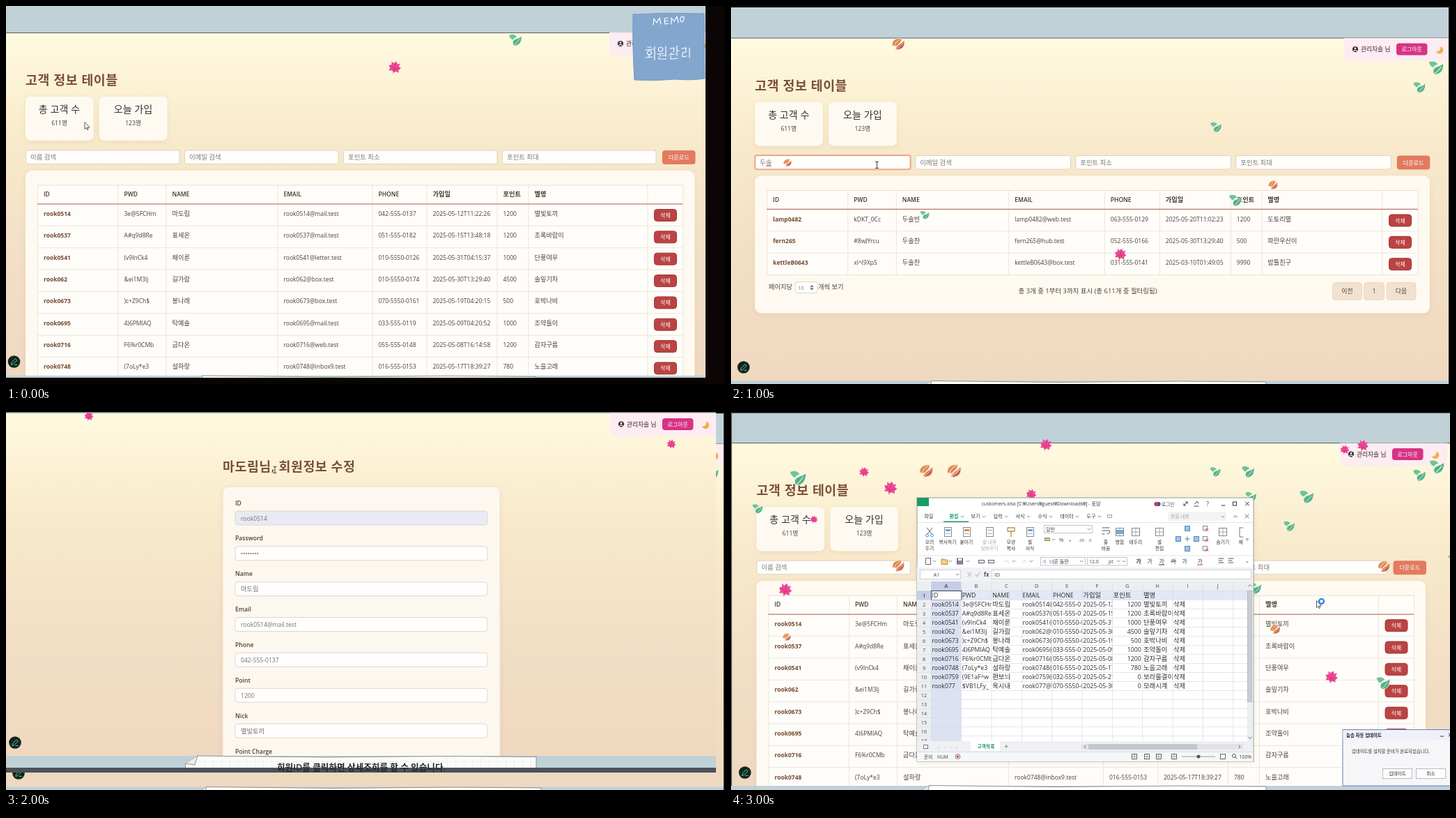
Recreate the animation shown at these times as an HTML page. Size 1032 by 542 pixels, loop 4000 ms.

```html
<!DOCTYPE html>
<html lang="ko">
<head>
<meta charset="utf-8">
<title>고객 정보 테이블</title>
<style>
html, body { margin: 0; width: 100%; height: 100%; overflow: hidden; background: #000; }
#stage { display: block; width: 100vw; height: 100vh; }
text { font-family: "Open Sans", "Noto Sans CJK KR", "Noto Sans CJK", sans-serif; white-space: pre; }
.b { font-weight: 600; }
.bb { font-weight: 700; }
.m { text-anchor: middle; }
.e { text-anchor: end; }
.wide { letter-spacing: .55px; }
.scene { visibility: hidden; animation: show 4s step-end infinite; }
@keyframes show { 0% { visibility: visible; } 25%, 100% { visibility: hidden; } }
</style>
</head>
<body>
<svg id="stage" viewBox="0 0 1032 542">
  <defs>
    <linearGradient id="bg" x2="0" y2="1">
      <stop offset="0" stop-color="#fffae0"/>
      <stop offset=".3" stop-color="#f9eacc"/>
      <stop offset=".65" stop-color="#f2dfc6"/>
      <stop offset="1" stop-color="#efd8c0"/>
    </linearGradient>
    <filter id="soft" x="-10%" y="-10%" width="120%" height="125%">
      <feDropShadow dx="0" dy="2" stdDeviation="3" flood-color="#8a5a30" flood-opacity=".11"/>
    </filter>
    <clipPath id="form"><rect width="1019" height="517"/></clipPath>
    <g id="g" stroke="#f3f1da" stroke-width="1">
      <path fill="#4fb28a" d="M10-7C11 3 6 9-2 9C-6 4-4 0 1-2C4-3 8-4 10-7Z"/>
      <path fill="#6cc39c" d="M-10-8C-5-11 1-9 3-5C0-4-3-2-4 0C-7-2-10-4-10-8Z"/>
      <path fill="none" d="M7-2Q3 4-3 9"/>
    </g>
    <g id="o" stroke="#f8e2c8" stroke-width="1">
      <path fill="#dd8a50" d="M-9 2C-10-6-3-10 5-9C6-4 1-1-3 3Z"/>
      <path fill="#c9614f" d="M9-6C11 2 7 9-4 8C-4 3 2 1 9-6Z"/>
      <path fill="none" d="M3-8Q-4-4-6 2M8-3Q3 3-3 7"/>
    </g>
    <g id="p" transform="rotate(14)">
      <path fill="#ee4a97" d="M0-10L3-6 7-8 6-3 10-1 7 3 8 7 3 6 0 8-3 6-8 7-7 3-10-1-6-3-7-8-3-6Z"/>
      <path fill="none" stroke="#c93578" d="M0-6V10M0 4L-6-1M0 4L6-1"/>
    </g>
  </defs>
</svg>
<script>
const INK = '#46403c', BROWN = '#7a4f38', GREEN = '#1c9a68';
const esc = s => s.replace(/&/g, '&amp;').replace(/</g, '&lt;');
const hangul = /[가-힣]/;

// Hangul is set a little larger than Latin to balance with it.
const T = (x, y, s, size = 8.6, fill = INK, cls = '') =>
  `<text x="${x}" y="${y}" font-size="${hangul.test(s) ? size * 1.08 : size}" fill="${fill}" class="${cls}">${esc(s)}</text>`;
const R = (x, y, w, h, fill, rx = 0, more = '') =>
  `<rect x="${x}" y="${y}" width="${w}" height="${h}" fill="${fill}" rx="${rx}" ${more}/>`;
const box = (x, y, w, h, fill, line, rx = 0) => R(x + .5, y + .5, w - 1, h - 1, fill, rx, `stroke="${line}"`);
const P = (d, stroke = '#555', w = 1, fill = 'none') =>
  `<path d="${d}" stroke="${stroke}" stroke-width="${w}" fill="${fill}" stroke-linecap="round" stroke-linejoin="round"/>`;
const C = (x, y, r, fill, more = '') => `<circle cx="${x}" cy="${y}" r="${r}" fill="${fill}" ${more}/>`;
const move = (x, y, s) => `<g transform="translate(${x} ${y})">${s}</g>`;
const each = (list, fn) => list.map(fn).join('');
const SOFT = 'filter="url(#soft)"';

// Each leaf: kind, x, y, size, turn
const leaves = s => each(s.split(' '), l => {
  const [x, y, size, turn = 0] = l.slice(1).split(',');
  return `<use href="#${l[0]}" transform="translate(${x} ${y}) rotate(${turn}) scale(${size / 20})"/>`;
});

const people = [
  'rook0514|3e@5FCHm|마도림|mail.test|042-555-0137|2025-05-12T11:22:26|1200|별빛토끼',
  'rook0537|A#q9d8Re|표세온|mail.test|051-555-0182|2025-05-15T13:48:18|1200|초록바람이',
  'rook0541|(v9InCk4|채이룬|letter.test|010-5550-0126|2025-05-31T04:15:37|1000|단풍여우',
  'rook062|&ei1M3lj|길가람|box.test|010-5550-0174|2025-05-30T13:29:40|4500|솔잎기차',
  'rook0673|)c+Z9Ch$|봉나래|box.test|070-5550-0161|2025-05-19T04:20:15|500|호박나비',
  'rook0695|4)6PMlAQ|탁예솔|mail.test|033-555-0119|2025-05-09T04:20:52|1000|조약돌이',
  'rook0716|F6%r0CMb|금다온|web.test|055-555-0148|2025-05-08T16:14:58|1200|감자구름',
  'rook0748|(7oLy*e3|설하랑|inbox9.test|016-555-0153|2025-05-17T18:39:27|780|노을고래',
  'rook0759|(9E1aF^w|편보늬|web.test|032-555-0195|2025-05-21T09:12:40|0|보라물결이랑',
  'rook077|$VB1LFy_|옥시내|box.test|070-5550-0108|2025-05-30T08:31:05|0|모래시계'
];
const found = [
  'lamp0482|kDKT_0Cc|두솔빈|web.test|063-555-0129|2025-05-20T11:02:23|1200|도토리별',
  'fern265|#8wJYrcu|두솔찬|hub.test|052-555-0166|2025-05-30T13:29:40|500|파란우산이',
  'kettleB0643|xl^(9XpS|두솔찬|box.test|031-555-0141|2025-03-10T01:49:05|9990|밤톨친구'
];
const cells = row => {
  const c = row.split('|');
  c[3] = c[0] + '@' + c[3];
  return c;
};
const heads = ['ID', 'PWD', 'NAME', 'EMAIL', 'PHONE', '가입일', '포인트', '별명'];

const note = (x, y, w = 503) =>
  P(`M${x} ${y + 11}L${x + 17} ${y}L${x + w * .4} ${y + 2}L${x + w * .75} ${y + .5}L${x + w} ${y + 1.5}V${y + 40}H${x}Z`, '#8c8f8c', 1, '#fdfdfa') +
  P(`M${x} ${y + 11}L${x + 13} ${y + 13}L${x + 17} ${y}`, '#8c8f8c', 1, '#eceee8');

const page = (top, bottom, right) =>
  R(0, 0, right, 542, '#c0d1d8') + R(0, top, right, bottom - top, 'url(#bg)') + R(0, top - .5, right, 1, '#5b6060');

const moon = (x, y) => P(`M${x + 1} ${y - 5}A5.3 5.3 0 1 1 ${x - 5} ${y + 2}A5.3 5.3 0 0 0 ${x + 1} ${y - 5}Z`, 'none', 0, '#f0b04a');

const pill = (x, y) => move(x, y,
  P('M880 46H1034V79H888Q880 79 880 71Z', 'none', 0, '#fdecf1') +
  C(896, 62, 4, '#2e2a2c') + C(896, 60.7, 1.4, '#fdecf1') + P('M893.6 64.6Q896 62 898.4 64.6', '#fdecf1', 1.2) +
  T(904, 65.3, '관리자솔 님', 8.1, '#332c2e') +
  R(955, 53.5, 44.5, 17, '#d63384', 4) + T(977.2, 65, '로그아웃', 7.4, '#fff', 'm') + moon(1017, 63));

const pen = (x, y) => C(x, y, 8.8, '#17221f') +
  move(x, y, P('M-4 4L-3.3 1L2 -4.2L4.3 -2L-1 3.3ZM1 4.4H4.5', '#3fd890', 1));

const arrow = (x, y) => P(`M${x} ${y}V${y + 9.5}L${x + 2.3} ${y + 7.5}L${x + 3.8} ${y + 10.7}L${x + 5.2} ${y + 10}L${x + 3.7} ${y + 7}H${x + 6.6}Z`, '#333', .8, '#fff');
const beam = (x, y) => P(`M${x - 2} ${y - 4.5}H${x + 2}M${x} ${y - 4.5}V${y + 4.5}M${x - 2} ${y + 4.5}H${x + 2}`, '#333', .9);

const card = (x, label, n) => R(x, 130, 97.5, 63, '#fefaf2', 7, SOFT) +
  T(x + 48.5, 153, label, 13.1, '#333', 'm') + T(x + 48.5, 171, n, 8, INK, 'm');

function list({ cols, rows, inputW, step, button, panelH, query }) {
  const end = cols.at(-1), y0 = 284, rowH = 31.35;
  const last = y0 + rows.length * rowH;
  let s = T(28, 113, '고객 정보 테이블', 17, BROWN, 'b wide') + card(28, '총 고객 수', '611명') + card(134, '오늘 가입', '123명');
  s += each(['이름 검색', '이메일 검색', '포인트 최소', '포인트 최대'], (label, i) => {
    const x = 28 + i * step, on = query && !i;
    return (on ? R(x - 1.5, 205, inputW + 3, 23, '#f5c6b0', 4) : '') +
      box(x, 206.5, inputW, 20.5, '#fffefb', on ? '#e08a6c' : '#ddd2c6', 3) +
      T(x + 7, 220.3, on ? query : label, 8.7, '#7d7974');
  });
  if (query) s += R(44, 222, 8, .8, '#777');
  s += R(button, 207, 47.5, 20, '#e27a60', 4) + T(button + 23.8, 220, '다운로드', 7.5, '#fff', 'm');
  s += R(28, 236, end + 17 - 28, panelH, '#fffaf1', 9, SOFT) + R(45, 257, end - 45, last - 257, '#fffdf9');
  s += each(cols, x => R(x, 257, 1, last - 257, '#ece5dc')) + R(45, 256.5, end - 45, 1, '#e6dfd6');
  s += each(heads, (h, i) => T(cols[i] + 9, 273.3, h, 8.5, '#40342e', 'b'));
  s += each(rows, (row, r) => {
    const y = y0 + r * rowH, mid = (cols[8] + end) / 2 + .5;
    return each(cells(row), (c, i) => T(cols[i] + 9, y + 17, c, 8.5, i ? INK : '#744a30', i ? '' : 'bb')) +
      R(45, y + rowH - .5, end - 45, 1, '#ece5dc') +
      box(mid - 16.5, y + 7, 33, 18, '#bb4343', '#a53636', 4) + T(mid, y + 19, '삭제', 7.3, '#fff', 'm');
  });
  return s + R(45, 283.3, end - 45, 1.2, '#b5766a');
}

const full = { cols: [45, 160.5, 229.5, 389.5, 525.5, 603.5, 704.5, 749.5, 920.5, 971.5], rows: people.slice(0, 8), inputW: 221.5, step: 228, button: 942, panelH: 330 };
const filtered = { cols: [45, 161, 230.5, 392, 529.5, 608.5, 710.5, 755, 928, 979.5], rows: found, inputW: 223.5, step: 230, button: 949.5, panelH: 197, query: '두솔' };

const memo = () =>
  P('M900 12Q950 9 1002 11L1003 104Q985 107 960 105Q930 108 902 106Q899 60 900 12Z', '#7699c4', 1, '#83a6ce') +
  P('M929 27L930 18L934 24L938 17L940 26M950 17L945 18L946 26L951 25M945.5 22L950 21M955 26L955 17L959 22L963 15L965 24M971 15Q967 16 968 21Q971 25 973 19Q974 15 971 15', '#fff', 1.2) +
  P('M921 59H926M918 63L929 62M923 64A3 3 0 1 0 924 64M923 70V73M918 74L928 73M931 58V77' +
    'M939 59A3.2 3.2 0 1 0 940 59M935 69L944 68M939 69V72M942 71H946M947 58V72M937 73V76H948' +
    'M953 61L959 60L958 66M955 67V69M952 70L960 69M963 57V71M963 64H966M954 72V76L964 75' +
    'M970 61L976 60V66L971 67V73L977 72M981 60V74', '#fff', 1.2);

const sceneList = () => page(38.5, 530, 1004) + list(full) + pill(-14, -8) +
  R(0, 530, 1004, 4, '#c0d1d8') + note(265, 530, 495) + leaves('g731,49,18 p558,88,18') +
  R(0, 533, 1032, 9, '#080504') + R(1004, 0, 28, 542, '#0b0605') + pen(11.5, 510) + arrow(113, 167) + memo();

const pageButton = (x, w, s) => box(x, 396, w, 26, '#f3e1d0', '#ecd8c5', 4) + T(x + w / 2, 412, s, 8.2, INK, 'm');

const sceneSearch = () => page(46, 537.5, 1030) + R(0, 0, 1032, 2, '#080808') + move(6.3, 7.5, list(filtered)) + pill(0, 0) +
  T(54, 406, '페이지당', 8.6) + box(91.5, 395, 33, 17, '#fff', '#ddd5cc', 3) + T(96, 407, '10', 7.5, '#777') +
  P('M114 402.5L116 400.5L118 402.5ZM114 405L116 407L118 405Z', '#555', .5, '#555') + T(125, 406, '개씩 보기', 8.6) +
  T(512, 412, '총 3개 중 1부터 3까지 표시 (총 611개 중 필터링됨)', 8.75, INK, 'm') +
  pageButton(863, 43, '이전') + pageButton(908, 30, '1') + pageButton(940.5, 43, '다음') +
  leaves('o240,55,19 g1012,89,21 g988,117,17 g696,174,16 o81,225,12 o778,257,14 g724,279,18 g278,300,13 p559,356,17') +
  beam(209.5, 228) + pen(18, 518) + note(271, 537.5, 497) + R(1030, 0, 2, 542, '#1a1614');

function sceneForm() {
  const me = cells(people[0]);
  const fields = ['ID', me[0], 'Password', '••••••••', 'Name', me[2], 'Email', me[3], 'Phone', me[4], 'Point', me[6], 'Nick', me[7], 'Point Charge', ''];
  let s = R(0, 0, 1019, 493, 'url(#bg)') + R(0, 0, 1019, 1.5, '#6f7f86') + pill(-13, -44.5) +
    T(311, 85, me[2] + '님, 회원정보 수정', 17, BROWN, 'b wide') +
    R(311, 107, 398, 420, '#fdf8ef', 9, SOFT + ' stroke="#f0e0cc"');
  for (let i = 0; i < 8; i++) {
    const y = i * 50.85;
    s += T(329, 133.6 + y, fields[2 * i], 8.6, '#533c30', 'b') +
      box(328.5, 141.5 + y, 363, 21, i ? '#fffefd' : '#e9eaf4', '#ddd6d0', 4) +
      T(337, 155.6 + y, fields[2 * i + 1], 8.6, '#75716e');
  }
  s += R(0, 493, 1019, 24, '#c0d1d8') + note(258, 493);
  for (let x = 285; x < 755; x += 12) s += R(x, 496, .6, 14, '#e3e8e4');
  s += R(276, 501, 482, .6, '#e3e8e4') + R(0, 510, 1019, 7, '#4b5359') +
    T(510, 514, '회원ID를 클릭하면 상세조회를 할 수 있습니다.', 11.7, '#25282a', 'b m') +
    leaves('p119,6,13 p955,46,13') + beam(386, 83) + pen(13, 474);
  return sceneSearch() + `<g clip-path="url(#form)">${s}</g>`;
}

// Small helpers for the spreadsheet window
const down = (x, y) => P(`M${x - 2} ${y - 1}L${x} ${y + 1}L${x + 2} ${y - 1}`, '#777', .8);
const label = (x, lines, fill = '#333') => each(lines.split('/'), (l, i) => T(x, 189 + i * 9.3, l, 6.3, fill, 'm'));
const sheetIcon = (x, y, mark = '#6ea6da') => box(x - 5, y - 7, 11, 14, '#fff', '#8a8a8a') + R(x - 3, y - 4, 7, 3, mark) + R(x - 3, y + 2, 7, 1, '#aaa');
const gridIcon = (x, y) => box(x - 6, y - 6, 12, 12, '#fff', '#888') + P(`M${x} ${y - 6}V${y + 6}M${x - 6} ${y}H${x + 6}`, '#999', .8);
const cellIcon = (x, y) => box(x - 4, y - 4, 8, 8, '#9cc3ea', '#5f86ad');

function ribbon() {
  let s = R(267, 123, 17, 12, GREEN) + T(445, 134.3, 'customers.xlsx [C:₩Users₩guest₩Downloads₩] - 표담', 6.6, '#333', 'm') +
    R(607.5, 129, 9, 6, '#3c4f9c', 3) + C(610.5, 132, 3, '#c8434b') + T(618, 134.5, '로그인', 6.2) +
    P('M650 134L655 129M652.5 129H655V131.5M650 131.5V134H652.5M665 135H671M666 132L669 128L671 131', '#444') + T(684, 135, '?', 8.5, '#444', 'm') +
    P('M704 134H709M738.5 129L743.5 134M743.5 129L738.5 134', '#333') + box(720, 128.5, 6, 6, 'none', '#333');
  s += each(['파일', '편집', '보기', '입력', '서식', '수식', '데이터', '도구'], (m, i) => {
    const x = [284, 320, 351, 383, 415, 447, 482, 517][i];
    return T(x, 152, m, 6.5, i === 1 ? GREEN : '#333', i === 1 ? 'b m' : 'm') + (i ? down(x + (i === 6 ? 15 : 12), 150) : '');
  });
  s += R(305, 156.5, 36, 1.5, GREEN) + box(540, 147, 7, 5, '#eee', '#aaa') + R(627, 143, 84, 13, '#f3f3f4', 2) +
    T(631, 152, '찾을 내용', 6.3, '#aaa') + down(706, 150) + P('M721.5 151L724 148.5L726.5 151M738 147L743 152M743 147L738 152', '#666') + R(267, 158, 482, .8, '#ddd');
  s += P('M281 166L288 175M289 166L282 175', '#666') + C(281.5, 177, 2, 'none', 'stroke="#4a8fd0"') + C(288.5, 177, 2, 'none', 'stroke="#4a8fd0"') +
    sheetIcon(311, 172) + sheetIcon(338, 172, '#e08a4c') + sheetIcon(371, 172, '#ccd6e2') + P('M397 166H407V171H397ZM402 171V179', '#c58a4c', 1.3) + sheetIcon(429, 172);
  s += label(285, '오려/두기') + label(311, '복사하기') + label(338, '붙이기') + label(371, '셀 내용/맞바꾸기', '#aaa') + label(402, '모양/복사') + label(429, '셀/서식');
  s += box(449, 162, 70, 12, '#fff', '#c4c4c8') + T(452, 171, '일반', 6.5) + down(514, 168) +
    box(450, 180, 8, 5, '#e7c86a', '#888') + down(463, 183) + T(474, 186, '%', 8, '#444', 'm') + T(487, 185, ',', 10, '#444', 'm') + T(503, 186, '.00', 5.5, '#447', 'm') + T(515, 186, '.0', 5.5, '#447', 'm');
  s += P('M533 166H543M533 170H543Q545 174 540 175M533 175H536', '#555') + gridIcon(558, 172) + R(553, 169, 10, 6, '#75a8dc') + gridIcon(581, 172) + gridIcon(615, 172) + gridIcon(706, 172) + P('M730 166H735M730 166V179H735', '#777');
  s += label(538, '줄/바꿈') + label(558, '병합') + label(581, '테두리') + label(615, '셀/편집') + label(706, '숨기기') + label(732, '재');
  s += cellIcon(655, 167) + cellIcon(642, 182) + cellIcon(668, 182) + cellIcon(655, 196) + P('M652 182H658M655 179V185', '#678') +
    each([167, 182, 196], y => box(677, y - 4, 7, 7, '#fff', '#888') + P(`M681 ${y}L685 ${y + 4}M685 ${y}L681 ${y + 4}`, '#d04848'));
  s += R(267, 205.5, 482, .8, '#ddd') + box(279, 209, 8, 10, '#fff', '#666') + P('M302 218V211H306L307 212H311V218Z', '#b98a3a', 1, '#f2d27c') +
    box(324, 209.5, 9, 9, '#889', '#667') + R(326, 210, 5, 3, '#fff') + box(355, 212, 9, 5, '#eee', '#666') + box(369, 212, 9, 5, '#eee', '#666') + P('M393 215Q396 211 399 216M418 216Q421 211 424 215', '#ccc') +
    each([292, 315, 340, 406, 431], x => down(x, 214)) +
    box(444, 208, 65, 12.5, '#fff', '#c4c4c8') + T(447, 217, '가', 5.5, '#3a78c0') + T(457, 217, '너른 들판', 6.5) + down(503, 214) +
    box(511, 208, 58, 12.5, '#fff', '#c4c4c8') + T(514, 217, '12.0', 7) + T(542, 217, 'pt', 6.8) + down(556, 214) + down(564, 214);
  s += each([585, 601, 618, 635, 651, 673], (x, i) => T(x, 217, '가', 7.2, '#333', i ? 'm' : 'b m') + (i === 2 || i === 5 ? R(x - 4, 218.5, 8, 1, i === 5 ? '#d23' : '#333') : '') + (i === 3 ? R(x - 4, 213.5, 8, .8, '#333') : '')) +
    each([700, 714], x => P(`M${x} 210H${x + 7}M${x} 213H${x + 5}M${x} 216H${x + 7}`, '#555')) + T(741, 217, '»', 7, '#666', 'm') + T(741, 185, '»', 9, '#666', 'm');
  return s + R(267, 223, 482, 20, '#f1f2f5') + box(271, 226, 59, 14, '#fff', '#cfd2d8') + T(295, 235.6, 'A1', 7, INK, 'm') + down(325, 233) +
    P('M340 230L345 236M345 230L340 236M351 233L353 236L357 230', '#aaa') + T(363, 236, 'fx', 8, '#333', 'b') + box(374, 226, 373, 14, '#fff', '#cfd2d8') + T(378, 236, 'ID', 8);
}

function sheet() {
  const left = 287, colW = 43.35, top = 256, rowH = 13;
  const rows = [heads, ...people.map(cells)];
  let s = R(267, 243, 474, 13, '#eceef2') + R(267, top, 20, 216, '#eceef2') +
    R(left, 243, colW, 13, '#c5cee6') + R(267, top, 20, rowH, '#c5cee6') +
    R(left, top, colW, 216, '#dce2f2') + R(left, top, 454, rowH, '#e3e8f5');
  for (let i = 0; i < 11; i++) {
    const x = left + i * colW;
    s += R(x, 243, .7, 229, '#d8dbe2');
    if (i < 10) s += T(x + colW / 2, 252, 'ABCDEFGHIJ'[i], 7.5, '#444', i ? 'm' : 'b m');
  }
  for (let r = 0; r < 17; r++) {
    const y = top + r * rowH;
    s += R(267, y, 474, .7, '#d8dbe2') + T(277, y + 9.5, String(r + 1), 7.3, '#444', r ? 'm' : 'b m');
    if (!r) s += box(left, y, colW + 1, rowH + 1, '#fff', '#33406a');
    s += each(rows[r] || [], (c, i) => {
      const num = r && i === 6;
      return `<svg x="${left + i * colW}" y="${y}" width="${i === 7 ? 43 : colW}" height="13">${T(num ? 41.5 : 1.5, 9.8, c, 8.7, '#2c2c2c', num ? 'e' : '')}</svg>`;
    });
    if (r && r < 11) s += T(left + 8 * colW + 1.5, y + 9.8, '삭제', 8.4, '#2c2c2c');
  }
  s += R(741, 243, 8, 229, '#eceef2') + box(741, 256, 7, 160, '#c9ccd2', '#b9bcc2') + P('M742.5 250L745 247.5L747.5 250M742.5 466L745 468.5L747.5 466', '#777');
  s += R(267, 472, 482, 15, '#eef0f3') + box(276, 477, 7, 6, '#fff', '#777') + T(297, 483, '‹   ‹   ›   ›', 8, '#bbb') +
    R(344, 472, 42, 14, '#fff') + T(366, 481.5, '고객목록', 6.3, GREEN, 'b m') + T(395, 483, '+', 10, '#666', 'm') +
    R(503, 476, 232, 8, '#e0e2e6') + R(513, 476, 156, 8, '#c4c7cd') + P('M509 478L507 480L509 482M729 478L731 480L729 482', '#666');
  return s + R(267, 487, 482, 14, '#f6f7f8') + R(267, 487, 482, .8, '#d5d7da') + T(277, 496.6, '준비', 6.2) + T(296, 496.6, 'NUM', 6.6) +
    C(325.5, 494, 3.4, '#fff', 'stroke="#777"') + C(325.5, 494, 1.8, '#d33') +
    each([579, 597, 614, 636], x => box(x - 4, 490, 8, 8, '#fff', '#666') + P(`M${x - 4} 494H${x + 4}M${x} 490V498`, '#777', .7)) +
    R(647, 493.7, 48, .8, '#888') + C(671, 494, 2.5, '#555') + box(702, 490, 8, 8, '#fff', '#666') +
    C(722, 493, 2.5, 'none', 'stroke="#555"') + P('M724 495L726 497', '#555') + T(747, 497, '100%', 6.9, INK, 'e');
}

const popup = () => box(877.5, 455, 160, 81.5, '#f6f6f8', '#6d7fb4') + R(878.5, 456, 153.5, 14, '#eef1fa') +
  T(883, 465.5, '늘솜 자동 업데이트', 6, '#222', 'b') + P('M1018.5 465H1022.5M1030 461L1034 465M1030 465L1034 461', '#333') +
  T(891, 488.6, '업데이트를 설치할 준비가 완료되었습니다.', 5.9, '#333') +
  box(935, 511, 43, 15, '#fdfdfd', '#b9bcc4') + T(956.5, 521, '업데이트', 6.2, '#333', 'm') +
  box(983, 511, 43, 15, '#fdfdfd', '#b9bcc4') + T(1004.5, 521, '취소', 6.2, '#333', 'm');

const sceneSheet = () => page(44.5, 536, 1032) + R(0, 0, 1032, 1.5, '#0a0a0a') + move(8.5, 6.2, list(full)) + pill(-6, -1.5) +
  R(0, 0, 1.2, 536, '#4c4a46') + R(0, 536, 1032, 6, '#c0d1d8') + note(268, 535.5, 500) +
  leaves('g96,95,23 p191,86,14 p229,109,19 p452,47,17 p431,118,15 o280,85,20 o320,85,21 g695,86,15 g742,86,18 ' +
    'g826,122,20 g801,164,16 g988,91,18 g1013,79,21 g746,122,16 g752,253,18 o240,221,18 o937,222,18 p78,255,19 ' +
    'o80,323,12 o781,312,15 p862,380,18 g936,389,19 p119,154,11 p881,54,13 p907,48,16 g38,139,15 g1034,210,10') +
  R(267, 123, 483, 378, '#fff', 0, 'stroke="#9a9ca0" ' + SOFT) + ribbon() + sheet() + popup() + pen(20, 517) +
  arrow(840.5, 271) + C(847.5, 271.5, 3.5, '#e8f3ff', 'stroke="#2d7fd8" stroke-width="2.2"');

document.getElementById('stage').insertAdjacentHTML('beforeend',
  each([sceneList, sceneSearch, sceneForm, sceneSheet], (draw, i) =>
    `<g class="scene" style="animation-delay:${i - 4}s">${draw()}</g>`));
</script>
</body>
</html>
```
